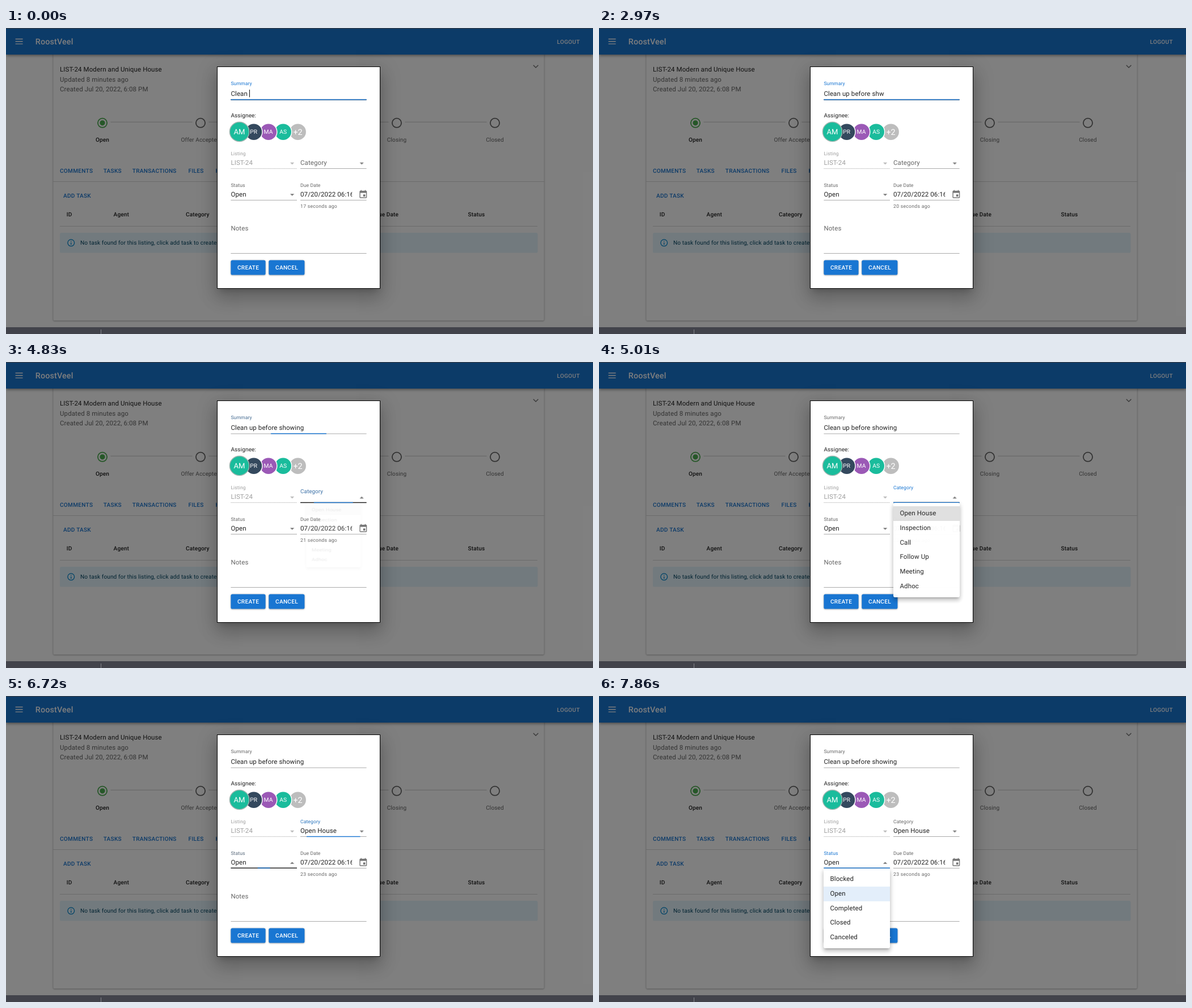
These frames come from a looping animation (1035x541 px, 8 s). An HTML page:

```html
<!DOCTYPE html>
<html lang="en">
<head>
<meta charset="utf-8">
<title>New task dialog</title>
<style>
html, body { margin: 0; width: 100%; height: 100%; overflow: hidden; background: #808080; }
body { position: relative; font-family: Roboto, sans-serif; }
svg { position: absolute; left: 0; top: 0; display: block; }
text { white-space: pre; text-rendering: geometricPrecision; fill: rgba(0,0,0,.87); }

.body { font-size: 11.5px; letter-spacing: .00938em; }
.small { font-size: 10.07px; letter-spacing: .01071em; }
.label { font-size: 8.63px; letter-spacing: .00938em; }
.help { font-size: 8.63px; letter-spacing: .03333em; }
.btn { font-size: 10.07px; font-weight: 500; letter-spacing: .02857em; }
.med { font-weight: 500; }
.mid { text-anchor: middle; }
.grey { fill: rgba(0,0,0,.6); }
.off { fill: rgba(0,0,0,.38); }
.blue { fill: #1976d2; }
.white { fill: #fff; }
.rule { fill: rgba(0,0,0,.42); }
.hover { fill: rgba(0,0,0,.87); opacity: 0; }
.arrow { fill: rgba(0,0,0,.54); }
.raised { filter: drop-shadow(0 1.4px .8px rgba(0,0,0,.2)) drop-shadow(0 .7px 1.5px rgba(0,0,0,.2)); }

#dialog {
  position: absolute; left: 372.2px; top: 68.3px; width: 287.6px; height: 392.7px;
  box-sizing: border-box; border: 1.44px solid #000; background: #fff;
  box-shadow: 0 7.9px 10.8px -5px rgba(0,0,0,.2), 0 17.3px 27.3px 2.2px rgba(0,0,0,.14), 0 6.5px 33px 5.8px rgba(0,0,0,.12);
}
.menu {
  position: absolute; width: 116.6px; padding: 5.75px 0; border-radius: 2.9px; background: #fff;
  transform-origin: 50% 0; opacity: 0; text-rendering: geometricPrecision;
  box-shadow: 0 3.6px 3.6px -2.2px rgba(0,0,0,.2), 0 5.8px 7.2px .7px rgba(0,0,0,.14), 0 2.2px 10px 1.4px rgba(0,0,0,.12);
}
.menu div {
  position: relative; overflow: hidden; height: 25.88px; line-height: 25.88px; padding-left: 11.5px;
  color: rgba(0,0,0,.87);
}
.menu i {
  position: absolute; left: -22px; top: -47px; width: 120px; height: 120px; border-radius: 50%;
  background: rgba(0,0,0,.2); transform: scale(0);
}
#tip {
  position: absolute; left: 488.5px; top: 209.8px; padding: 2.9px 5.75px; border-radius: 2.9px;
  font-size: 7.9px; line-height: 11.2px; font-weight: 500; letter-spacing: .006em; white-space: nowrap;
  color: #fff; background: rgba(97,97,97,.92); transform-origin: 50% 0; opacity: 0;
  translate: -50% 0; text-rendering: geometricPrecision;
}

/* Every animation shares the same 8 s clock. */
.a { animation: 8s linear infinite; }
.cut { animation-timing-function: step-end; }
.out { animation-timing-function: cubic-bezier(0,0,.2,1); }
.std { animation-timing-function: cubic-bezier(.4,0,.2,1); }
#sumLine { transform-origin: 516px 0; animation-name: sumLine; }
#catLine { transform-origin: 577.3px 0; animation-name: catLine; }
#stLine { transform-origin: 454.7px 0; animation-name: stLine; }
#sumHover { animation-name: sumHover; }
#catHover { animation-name: catHover; }
#stHover { animation-name: stHover; }
#sumLabel { animation-name: sumLabel; }
#catLabel { animation-name: catLabel; }
#stLabel { animation-name: stLabel; }
#catArrow { animation-name: catArrow; }
#stArrow { animation-name: stArrow; }
#catValue { animation-name: catValue; }
#catFocus { animation-name: catFocus; }
#tip { animation-name: tipFade, tipGrow; }
#catMenu { animation-name: catFade, catGrow; }
#stMenu { animation-name: stFade, stGrow; }
#pick { animation-name: pick; }
#ripple { animation-name: ripple; }
#current { animation-name: current; }
#next { animation-name: next; }

@keyframes sumLine { 0%, 59.74% { transform: none } 62.24%, 100% { transform: scaleX(0) } }
@keyframes catLine { 0%, 59.74% { transform: scaleX(0) } 62.24%, 83.875% { transform: none } 86.375%, 100% { transform: scaleX(0) } }
@keyframes stLine { 0%, 83.875% { transform: scaleX(0) } 86.375%, 100% { transform: none } }
@keyframes sumHover { 0%, 49% { opacity: 1 } 50.7%, 100% { opacity: 0 } }
@keyframes catHover { 0%, 58% { opacity: 0 } 59.5%, 70.5% { opacity: 1 } 72.5%, 100% { opacity: 0 } }
@keyframes stHover { 0%, 76% { opacity: 0 } 77.7%, 83.875% { opacity: 1 } 86.375%, 100% { opacity: 0 } }
@keyframes sumLabel { 0%, 59.74% { fill: #1976d2 } 62.24%, 100% { fill: rgba(0,0,0,.6) } }
@keyframes catLabel {
  0%, 59.74% { transform: translate(519px,242px); fill: rgba(0,0,0,.6) }
  62.24%, 83.875% { transform: translate(519px,225.2px) scale(.75); fill: #1976d2 }
  86.375%, 100% { transform: translate(519px,225.2px) scale(.75); fill: rgba(0,0,0,.6) }
}
@keyframes stLabel { 0%, 83.875% { fill: rgba(0,0,0,.6) } 86.375%, 100% { fill: #1976d2 } }
@keyframes catArrow { 0%, 70.5%, 100% { transform: none } 59.74% { transform: rotate(180deg) } }
@keyframes stArrow { 0% { transform: none } 83.875%, 100% { transform: rotate(180deg) } }
@keyframes catValue { 0% { opacity: 0 } 70.5%, 100% { opacity: 1 } }
@keyframes catFocus { 0%, 83.875%, 100% { opacity: 0 } 70.5% { opacity: 1 } }
@keyframes tipFade { 0%, 52.05% { opacity: 0 } 54.55%, 57.375% { opacity: 1 } 59.8%, 100% { opacity: 0 } }
@keyframes tipGrow {
  0%, 52.05% { transform: scale(.75,.5625) } 53.71%, 58.2% { transform: none }
  59.8%, 100% { transform: scale(.75,.5625) }
}
@keyframes catFade {
  0%, 59.74% { opacity: 0 } 63.4% { opacity: 1 }
  70.5% { opacity: 1; animation-timing-function: linear }
  71.625% { opacity: .66; animation-timing-function: linear }
  72.75% { opacity: .12; animation-timing-function: linear }
  73.1%, 100% { opacity: 0 }
}
@keyframes catGrow {
  0%, 59.74% { transform: scale(.75,.5625) } 62.175%, 71.7% { transform: none }
  73.5%, 100% { transform: scale(.75,.5625) }
}
@keyframes stFade { 0%, 83.875% { opacity: 0 } 87.375%, 100% { opacity: 1 } }
@keyframes stGrow { 0%, 83.875% { transform: scale(.75,.5625) } 86.21%, 100% { transform: none } }
@keyframes pick { 0% { background: rgba(0,0,0,.12) } 70.5%, 100% { background: rgba(25,118,210,.12) } }
@keyframes ripple { 0%, 70.4% { transform: scale(0) } 71.625% { transform: scale(.62) } 73%, 100% { transform: none } }
@keyframes current {
  0%, 90.375% { background: rgba(25,118,210,.2) } 91.875%, 94.125% { background: rgba(25,118,210,.08) }
  95.625%, 100% { background: rgba(25,118,210,.12) }
}
@keyframes next {
  0%, 90.375% { background: rgba(0,0,0,0) } 91.875%, 94.125% { background: rgba(0,0,0,.04) }
  95.625%, 100% { background: rgba(0,0,0,0) }
}
</style>
</head>
<body>
<svg id="page" width="1035" height="541" viewBox="0 0 1035 541">
  <rect width="1035" height="541" fill="#fff"/>
  <rect x="83.3" y="40" width="865.4" height="477.3" rx="2.9" fill="#fff" class="raised"/>
  <rect y="1" width="1035" height="46" fill="#1976d2" style="filter:drop-shadow(0 2px 2.5px rgba(0,0,0,.4))"/>
  <path d="M16.6 19.5h13M16.6 23.8h13M16.6 28.1h13" stroke="#fff" stroke-width="1.44"/>
  <text x="51.8" y="28.6" class="med white" font-size="14.38" letter-spacing=".11">RoostVeel</text>
  <text x="971.5" y="27.5" class="btn white">LOGOUT</text>

  <text x="95" y="77.2" class="body">LIST-24 Modern and Unique House</text>
  <text x="95" y="94.5" class="body grey">Updated 8 minutes ago</text>
  <text x="95" y="111.8" class="body grey">Created Jul 20, 2022, 6:08 PM</text>
  <path d="M929.8 65.8l4.3 4.3 4.3-4.3" fill="none" stroke="#000" stroke-opacity=".54" stroke-width="1.44"/>

  <path d="M184.4 166.3H328.6M357.4 166.3H501.6M530.4 166.3H674.6M703.4 166.3H847.6" stroke="#bdbdbd" stroke-width=".8"/>
  <g fill="none" stroke="#000" stroke-opacity=".6" stroke-width="1.8">
    <circle cx="343" cy="167.8" r="8.1"/><circle cx="689" cy="167.8" r="8.1"/><circle cx="862" cy="167.8" r="8.1"/>
    <circle cx="170" cy="167.8" r="8.1" stroke="#4caf50" stroke-opacity="1"/>
  </g>
  <circle cx="170" cy="167.8" r="4.6" fill="#4caf50"/>
  <text x="170" y="200.6" class="small med mid">Open</text>
  <text x="343" y="200.6" class="small grey mid">Offer Accepted</text>
  <text x="689" y="200.6" class="small grey mid">Closing</text>
  <text x="862" y="200.6" class="small grey mid">Closed</text>

  <text x="95" y="255.9" class="btn blue">COMMENTS</text>
  <text x="171.8" y="255.9" class="btn blue">TASKS</text>
  <text x="222.8" y="255.9" class="btn blue">TRANSACTIONS</text>
  <text x="321.6" y="255.9" class="btn blue">FILES</text>
  <text x="369.6" y="255.9" class="btn blue">HISTORY</text>
  <rect x="83.3" y="271" width="865.4" height=".8" fill="#000" fill-opacity=".2"/>
  <text x="101" y="300.2" class="btn blue">ADD TASK</text>
  <text x="106.7" y="333.4" class="small med">ID</text>
  <text x="189.6" y="333.4" class="small med">Agent</text>
  <text x="317" y="333.4" class="small med">Category</text>
  <text x="650.3" y="333.4" class="small med">Due Date</text>
  <text x="814.6" y="333.4" class="small med">Status</text>
  <rect x="95" y="350" width="842" height=".8" fill="#000" fill-opacity=".2"/>
  <rect x="95" y="362" width="842.5" height="35.6" rx="2.9" fill="#e5f6fd"/>
  <g fill="none" stroke="#0288d1" stroke-width="1.3">
    <circle cx="114.7" cy="379.8" r="5.9"/><path d="M114.7 376.4v1.4M114.7 379.2v4"/>
  </g>
  <text x="131" y="383.4" class="small" style="fill:#014361">No task found for this listing, click add task to create one.</text>

  <rect width="1035" height="541" fill="#000" fill-opacity=".5"/>
  <rect width="1035" height="1" fill="#3a3b42"/>
  <rect y="529" width="1035" height="12" fill="#42434b"/>
  <rect x="167" y="533" width="1" height="8" fill="#85868c"/>
</svg>

<div id="dialog"></div>

<svg width="1035" height="541" viewBox="0 0 1035 541">
  <defs><path id="tri" d="M-3.6-1.8h7.2L0 1.8z"/></defs>

  <text x="396.4" y="101.2" class="label a out" id="sumLabel">Summary</text>
  <text x="396.4" y="119.9" class="body" id="typed"></text>
  <rect id="caret" y="109" width="1" height="13.4"/>
  <rect x="396.4" y="126.5" width="239.2" height=".8" class="rule"/>
  <rect x="396.4" y="125.9" width="239.2" height="1.44" class="hover a" id="sumHover"/>
  <rect x="396.4" y="125.9" width="239.2" height="1.44" class="blue a out" id="sumLine"/>

  <text x="396.4" y="157.8" class="small">Assignee:</text>
  <g stroke="#fff" stroke-width="1.44">
    <circle cx="514.6" cy="183.7" r="15" fill="#bdbdbd"/>
    <circle cx="488.7" cy="183.7" r="15" fill="#1abc9c"/>
    <circle cx="462.8" cy="183.7" r="15" fill="#9b59b6"/>
    <circle cx="436.9" cy="183.7" r="15" fill="#34495e"/>
    <circle cx="411.6" cy="183.4" r="17.2" fill="#1abc9c" stroke="#9fb5af"/>
  </g>
  <text x="514.6" y="188.8" class="mid white" font-size="14.4">+2</text>
  <text x="488.7" y="187.4" class="mid white" font-size="10.3">AS</text>
  <text x="462.5" y="187.4" class="mid white" font-size="10.3">MA</text>
  <text x="436.7" y="187.4" class="mid white" font-size="10.3">PR</text>
  <text x="411.4" y="188" class="mid white" font-size="13.1">AM</text>

  <text x="396.4" y="225.2" class="label off">Listing</text>
  <text x="396.4" y="242" class="body off">LIST-24</text>
  <path d="M396.4 248.6h116.6" stroke="#000" stroke-opacity=".42" stroke-width=".8" stroke-dasharray="1 .8"/>
  <use href="#tri" x="504.6" y="239.6" fill="#000" fill-opacity=".26"/>

  <rect x="519" y="229.2" width="116.6" height="19.4" fill="#000" fill-opacity=".05" class="a cut" id="catFocus"/>
  <text class="body a out" id="catLabel">Category</text>
  <text x="519" y="242" class="body a cut" id="catValue">Open House</text>
  <rect x="519" y="248.2" width="116.6" height=".8" class="rule"/>
  <rect x="519" y="247.8" width="116.6" height="1.44" class="hover a" id="catHover"/>
  <rect x="519" y="247.8" width="116.6" height="1.44" class="blue a out" id="catLine"/>
  <g transform="translate(627.2 239.6)"><use href="#tri" class="arrow a cut" id="catArrow"/></g>

  <text x="396.4" y="280.9" class="label a out" id="stLabel">Status</text>
  <text x="396.4" y="297.6" class="body">Open</text>
  <rect x="396.4" y="303.9" width="116.6" height=".8" class="rule"/>
  <rect x="396.4" y="303.4" width="116.6" height="1.44" class="hover a" id="stHover"/>
  <rect x="396.4" y="303.4" width="116.6" height="1.44" class="blue a out" id="stLine"/>
  <g transform="translate(504.6 295)"><use href="#tri" class="arrow a cut" id="stArrow"/></g>

  <text x="519" y="280.9" class="label grey">Due Date</text>
  <svg x="519" y="280" width="91.3" height="22"><text y="17.6" class="body">07/20/2022 06:16 PM</text></svg>
  <rect x="519" y="303.9" width="116.6" height=".8" class="rule"/>
  <path transform="translate(621.2 285.7) scale(.719)" fill="#000" fill-opacity=".54" d="M17 12h-5v5h5v-5zM16 1v2H8V1H6v2H5c-1.11 0-1.99.9-1.99 2L3 19c0 1.1.89 2 2 2h14c1.1 0 2-.9 2-2V5c0-1.1-.9-2-2-2h-1V1h-2zm3 18H5V8h14v11z"/>
  <text x="519" y="317.8" class="help grey" id="ago"></text>

  <text x="396.4" y="358" class="body grey">Notes</text>
  <rect x="396.4" y="398" width="239.2" height=".8" class="rule"/>

  <rect x="396.4" y="410.4" width="61.2" height="26.2" rx="2.9" class="blue raised"/>
  <rect x="463.3" y="410.4" width="63.1" height="26.2" rx="2.9" class="blue raised"/>
  <text x="427.1" y="427.1" class="btn white mid">CREATE</text>
  <text x="495" y="427.1" class="btn white mid">CANCEL</text>
</svg>

<div id="tip" class="a std">Moreb, Kaylin - @kaylinfmoreb@mail.test</div>

<div id="catMenu" class="menu body a std" style="left:519px;top:249.4px">
  <div id="pick" class="a cut">Open House<i id="ripple" class="a"></i></div>
  <div>Inspection</div><div>Call</div><div>Follow Up</div><div>Meeting</div><div>Adhoc</div>
</div>
<div id="stMenu" class="menu body a std" style="left:396.4px;top:305px">
  <div>Blocked</div><div id="current" class="a">Open</div><div id="next" class="a">Completed</div>
  <div>Closed</div><div>Canceled</div>
</div>

<script>
const LOOP = 8000;
const SUMMARY = 'Clean up before showing';
// [time, letters typed, stray letter, caret hidden]
const KEYS = [
  [0, 6], [90, 7], [360, 8], [660, 9], [900, 10], [1080, 11], [1320, 12], [1500, 13], [1590, 14],
  [1680, 15], [1860, 16], [2220, 17], [2370, 18], [2550, 18, 'w'], [2970, 18, 'w', true], [3030, 18],
  [3270, 19], [3450, 20], [3540, 21], [3600, 22], [3750, 23], [4230, 23, '', true]
];
const TICKS = [0, 660, 1590, 2370, 3270, 4950, 5640];

const $ = id => document.getElementById(id);
const typed = $('typed'), caret = $('caret'), ago = $('ago');
let start;

function draw(now) {
  start ??= now;
  const t = (now - start) % LOOP;

  const [, count, stray = '', hidden] = KEYS.findLast(k => k[0] <= t);
  typed.textContent = (SUMMARY.slice(0, count) + stray).replaceAll(' ', '\u00a0');
  caret.setAttribute('x', 396.4 + typed.getComputedTextLength());
  caret.style.opacity = hidden ? 0 : 1;

  ago.textContent = `${16 + TICKS.filter(s => s <= t).length} seconds ago`;
  requestAnimationFrame(draw);
}
requestAnimationFrame(draw);
</script>
</body>
</html>
```
